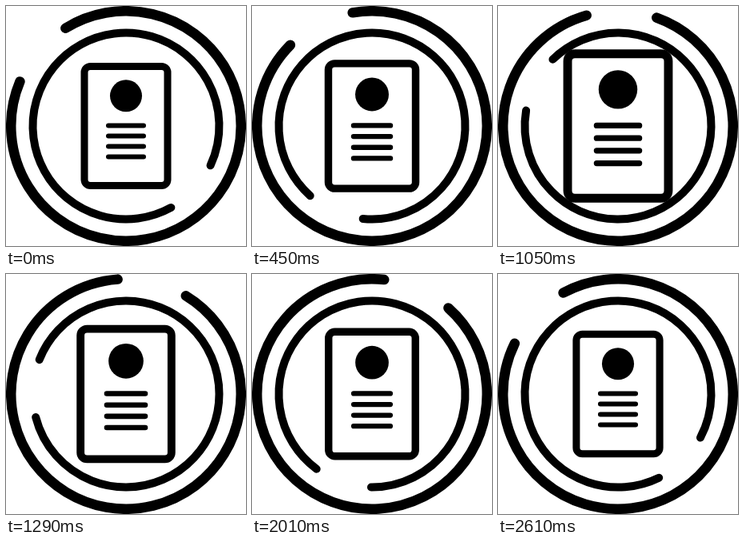
Animation of 300x300 px, one loop 2640 ms. Source, as an HTML page:

```html
<!DOCTYPE html>
<html lang="en">
<head>
<meta charset="utf-8">
<title>Document pulse</title>
<style>
  html, body { margin: 0; width: 100%; height: 100%; overflow: hidden; background: #fff; }
  svg { display: block; width: 100vw; height: 100vh; }
</style>
</head>
<body>
<svg viewBox="-150 -150 300 300" fill="none" stroke="#000" stroke-linecap="round">
  <circle id="outer" r="143.75" stroke-width="12.5" pathLength="360" stroke-dasharray="324.5 35.5"/>
  <circle id="inner" r="116.5" stroke-width="10" pathLength="360" stroke-dasharray="324 36"/>
  <g id="card">
    <rect x="-52" y="-74.5" width="104" height="149" rx="7.5" stroke-width="9"/>
    <circle cy="-37.7" r="20" fill="#000" stroke="none"/>
    <path d="M-22 -.5h44M-22 12.5h44M-22 25.5h44M-22 38.5h44" stroke-width="6"/>
  </g>
</svg>
<script>
  const LOOP = 2640;
  const [outer, inner, card] = ['outer', 'inner', 'card'].map(id => document.getElementById(id));

  // Each track is a list of [time, value] keys joined by straight lines.
  const outerAngle = [[0, 238.2], [1860, 329.2], [LOOP, 238.2]];
  const innerAngle = [[0, 60.9], [1055, 226.2], [LOOP, 60.9]];
  const cardScale = [[0, 1], [924, 1.1], [1056, 1.215], [1188, 1.1], [LOOP, 1]];

  function valueAt(track, t) {
    const i = track.findIndex(([time]) => time > t);
    const [t0, v0] = track[i - 1], [t1, v1] = track[i];
    return v0 + (v1 - v0) * (t - t0) / (t1 - t0);
  }

  function draw() {
    const t = performance.now() % LOOP;
    outer.setAttribute('transform', `rotate(${valueAt(outerAngle, t)})`);
    inner.setAttribute('transform', `rotate(${valueAt(innerAngle, t)})`);
    card.setAttribute('transform', `scale(${valueAt(cardScale, t)})`);
    requestAnimationFrame(draw);
  }
  draw();
</script>
</body>
</html>
```
